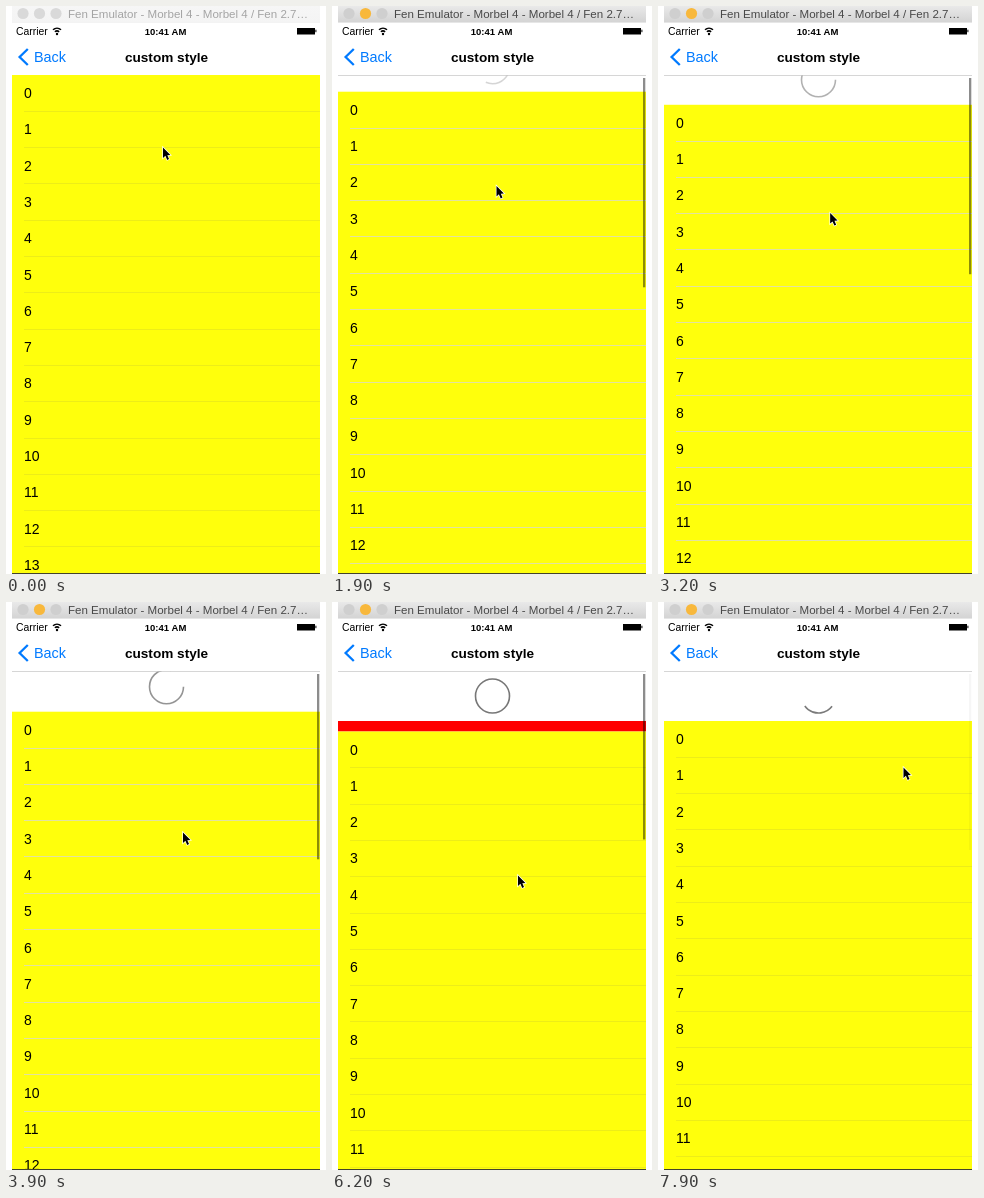
Animation of 320 by 568 pixels, one loop 8000 ms. Source, as an HTML page with a canvas:

```html
<!DOCTYPE html>
<html lang="en">
<head>
<meta charset="utf-8">
<title>Pull to refresh</title>
<style>
html, body { margin: 0; width: 100%; height: 100%; overflow: hidden; background: #fff; }
canvas { display: block; width: 320px; height: 568px; }
</style>
</head>
<body>
<canvas id="stage"></canvas>
<script>
const LOOP = 8000, TOP = 69, ROW = 36.3, HEADER = 50;
const PRESS = 300, RELEASE = 6600, SETTLED = 6950;
const FONT = '"Liberation Sans", Arial, sans-serif';

// [time, pull distance] and [time, x, y]
const PULL = [[PRESS, 0], [1900, 16.7], [2600, 20.4], [3900, 40.7], [4900, 48.7], [6200, 60.5], [RELEASE, 61.4]];
const POINTER = [[PRESS, 157, 141.5], [1900, 164.5, 180], [2600, 168, 187], [3900, 177, 230.5],
  [4900, 181, 247], [6200, 186, 273.5], [RELEASE, 186, 275], [7800, 245.5, 165.5]];

const canvas = document.getElementById('stage');
const c = canvas.getContext('2d');
const ratio = window.devicePixelRatio || 1;
canvas.width = 320 * ratio;
canvas.height = 568 * ratio;
c.scale(ratio, ratio);

const clamp = v => Math.max(0, Math.min(1, v));

function track(keys, t, i) {
  let a = keys[0];
  for (const b of keys) {
    if (t < b[0]) return a === b ? a[i] : a[i] + (b[i] - a[i]) * (t - a[0]) / (b[0] - a[0]);
    a = b;
  }
  return a[i];
}

function pullAt(t) {
  if (t < RELEASE) return track(PULL, t, 1);
  const left = 1 - clamp((t - RELEASE) / (SETTLED - RELEASE));
  return HEADER + (track(PULL, RELEASE, 1) - HEADER) * left ** 3;
}

function rect(color, x, y, w, h) {
  c.fillStyle = color;
  c.fillRect(x, y, w, h);
}

function text(s, x, y, size, color = '#000', weight = '', align = 'left') {
  c.font = `${weight} ${size}px ${FONT}`;
  c.textAlign = align;
  c.fillStyle = color;
  c.fillText(s, x, y);
}

function arc(x, y, r, from, to, color, width) {
  c.beginPath();
  c.arc(x, y, r, from, to);
  c.strokeStyle = color;
  c.lineWidth = width;
  c.stroke();
}

function dot(x, y, r, color) {
  c.beginPath();
  c.arc(x, y, r, 0, 7);
  c.fillStyle = color;
  c.fill();
}

function spinner(t, pull) {
  const y = TOP + Math.min(pull, HEADER) - 25;
  if (t >= RELEASE) {
    const mid = Math.PI / 2 + (t - 7900) / 1000 * 2 * Math.PI;
    arc(160.5, y, 17, mid - 0.93, mid + 0.93, '#7a7a7a', 1.6);
    return;
  }
  const part = clamp((pull - 1) / HEADER);
  if (part > 0) arc(160.5, y, 17, 0, part * 2 * Math.PI, `rgba(105,105,105,${part * 0.9})`, 1.6);
}

function table(t, pull) {
  const top = TOP + pull;
  c.save();
  c.beginPath();
  c.rect(6, TOP, 308, 568 - TOP);
  c.clip();
  rect('#fff', 6, TOP, 308, HEADER);
  if (pull > HEADER) rect('#f00', 6, TOP + HEADER, 308, pull - HEADER);
  spinner(t, pull);
  rect('#ffff0c', 6, top, 308, 568);
  // hairlines catch the pixel grid only at some offsets
  const line = pull % 1 > 0.65 && pull % 1 < 0.9 ? '#e2e2a0' : '#eded18';
  for (let i = 0; i < 14; i++) {
    const y = top + i * ROW;
    text(i, 18, Math.round(y + 23), 14);
    rect(line, 18, Math.floor(y + ROW), 296, 1);
  }
  c.restore();
  rect('#44442a', 6, 567, 308, 1);

  const shown = t < PRESS ? 0 : 1 - 0.92 * clamp((t - 7300) / 500);
  rect(`rgba(0,0,0,${0.45 * shown})`, 311, 72, 2.3, 226 - pull);
}

function titleBar(active) {
  const g = c.createLinearGradient(0, 0, 0, 16);
  g.addColorStop(0, active ? '#e9e9e9' : '#f6f6f6');
  g.addColorStop(1, active ? '#d4d4d4' : '#f4f4f4');
  rect(g, 6, 0, 308, 16);
  rect(active ? '#b8b8b8' : '#dcdcdc', 6, 16, 308, 0.6);
  const idle = active ? '#cfcfcf' : '#d9d9d9';
  dot(17, 7.5, 5.6, idle);
  dot(33.5, 7.5, 5.6, active ? '#f8b83c' : idle);
  dot(50, 7.5, 5.6, idle);
  text('Fen Emulator - Morbel 4 - Morbel 4 / Fen 2.7…', 62, 12, 11.56, active ? '#484848' : '#a4a4a4');
}

function navBar() {
  rect('#fff', 6, 16.6, 308, TOP - 16.6);
  text('Carrier', 10, 29, 10.4);
  for (const r of [3.2, 6]) arc(51, 28.2, r, -2.3, -0.84, '#000', 1.5);
  dot(51, 28, 1.2, '#000');
  text('10:41 AM', 159.5, 29, 9.5, '#000', 'bold', 'center');
  rect('#000', 291, 22, 18, 6.5);
  rect('#000', 309.4, 23.7, 1, 2.5);

  c.beginPath();
  c.moveTo(21.8, 43);
  c.lineTo(13.6, 51);
  c.lineTo(21.8, 59);
  c.strokeStyle = '#007aff';
  c.lineWidth = 2.3;
  c.stroke();
  text('Back', 28, 56, 14.4, '#007aff');
  text('custom style', 160.5, 56, 13.6, '#000', 'bold', 'center');
}

function pointer(x, y) {
  c.save();
  c.translate(x, y);
  c.beginPath();
  [[0, 0], [0, 10.5], [2.4, 8.3], [4.2, 12.4], [6, 11.6], [4.3, 7.7], [7.4, 7.5]]
    .forEach(p => c.lineTo(...p));
  c.closePath();
  c.strokeStyle = '#fff';
  c.lineWidth = 1.4;
  c.stroke();
  c.fillStyle = '#000';
  c.fill();
  c.restore();
}

function draw(now) {
  const t = now % LOOP, pull = pullAt(t);
  rect('#fff', 0, 0, 320, 568);
  table(t, pull);
  titleBar(t >= PRESS);
  navBar();
  if (pull > 0) rect('#c4c4c4', 6, TOP, 308, 0.7);
  pointer(track(POINTER, t, 1), track(POINTER, t, 2));
}

const start = performance.now();
function frame() {
  draw(performance.now() - start);
  requestAnimationFrame(frame);
}
frame();
</script>
</body>
</html>
```
